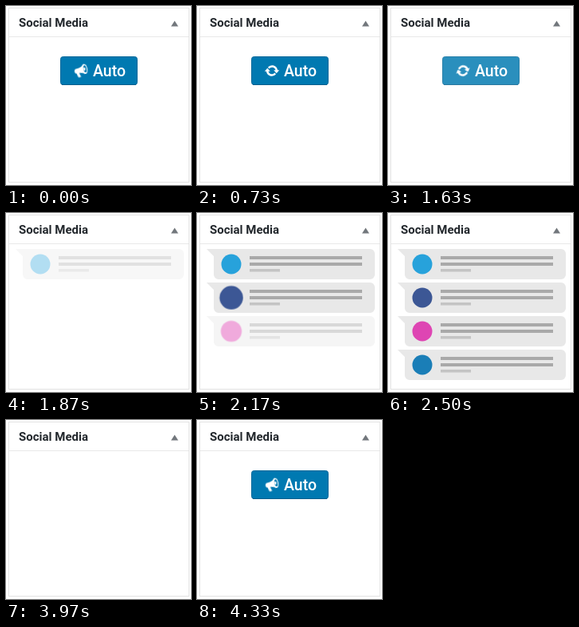
Animation, 232 px wide and 224 px high, one loop 5130 ms. Source, as an HTML page:

```html
<!DOCTYPE html>
<html lang="en">
<head>
<meta charset="utf-8">
<title>Social Media panel</title>
<style>
  html, body { margin: 0; width: 100%; height: 100%; overflow: hidden; background: #fff; }
  svg { display: block; width: 232px; height: 224px; }
  text { font-family: Roboto, Inter, sans-serif; font-weight: 500; }
  .title { font-size: 15px; font-weight: 600; fill: #23282d; }
  .label { font-size: 19.5px; fill: #fff; }
  .badge, #arrows { transform-box: fill-box; transform-origin: center; }
</style>
</head>
<body>
<svg id="stage" viewBox="0 0 232 224">
  <defs>
    <path id="arrow" d="M.2-6.72c3.53 0 6.43 2.61 6.92 6H9.2l-3.5 4-3.5-4h2.32C4.07-2.69 2.31-4.17.2-4.17c-1.45 0-2.73.71-3.54 1.78l-1.71-1.95C-3.77-5.8-1.89-6.72.2-6.72z"/>
    <g id="bubble">
      <path d="M12 0H217a6 6 0 0 1 6 6V32a6 6 0 0 1-6 6H27a6 6 0 0 1-6-6V9z" fill="#e8e8e8"/>
      <path d="M66 9h141v4H66zM66 17h141v4H66z" fill="#a9a9a9"/>
      <path d="M66 25h38v3.5H66z" fill="#c4c4c4"/>
    </g>
  </defs>
  <rect x="3.5" y="2.5" width="226" height="218" fill="#fff" stroke="#e2e2e2"/>
  <path d="M4 38.5H229" stroke="#e8e8e8"/>
  <text class="title" x="16" y="26">Social Media</text>
  <path d="M211.5 18.5 216 25.5H207z" fill="#72777c"/>

  <g id="button">
    <rect id="face" x="68.5" y="63.5" width="96" height="35" rx="3" fill="#0079b1" stroke="#006799"/>
    <path d="M70 98.5H163" stroke="#005d8c"/>
    <g id="megaphone" transform="translate(94 80) rotate(-12)">
      <path d="M-6-2.5C-1-2.5 2-4 4.5-6.5V6C2 4-1 3.5-3 3.5L-1.5 8.5H-5L-6.2 3.5C-9 3-9-2.2-6-2.5z" fill="#fff"/>
      <ellipse cx="4.8" cy="-.3" rx="3.5" ry="6.3" fill="#fff"/>
      <ellipse cx="5.3" cy="-.3" rx="1.9" ry="4.5" fill="#0079b1"/>
      <ellipse cx="4.5" cy="-.3" rx="1.2" ry="2" fill="#fff"/>
    </g>
    <g transform="translate(94 81)">
      <g id="arrows" fill="#fff">
        <use href="#arrow"/>
        <use href="#arrow" transform="rotate(180)"/>
      </g>
    </g>
    <text class="label" x="109" y="88">Auto</text>
  </g>
  <g id="rows"></g>
</svg>
<script>
const LOOP = 5130;
const SVG_NS = 'http://www.w3.org/2000/svg';
const COLORS = ['#27a2db', '#3c5795', '#de45b3', '#1a7eb7'];
const STAGGER = 140;
const byId = id => document.getElementById(id);

function add(parent, tag, attributes) {
  const node = document.createElementNS(SVG_NS, tag);
  for (const [name, value] of Object.entries(attributes)) node.setAttribute(name, value);
  return parent.appendChild(node);
}

// steps: [time in ms, value]; two steps at one time make a hard change.
function track(node, property, steps) {
  const all = [[0, steps[0][1]], ...steps, [LOOP, steps.at(-1)[1]]];
  const frames = all.map(([time, value]) => ({ offset: time / LOOP, [property]: value }));
  const animation = node.animate(frames, { duration: LOOP, iterations: Infinity });
  animation.startTime = document.timeline.currentTime;
}

const scale = value => `scale(${value})`;
const turn = degrees => `rotate(${degrees}deg)`;

track(byId('button'), 'opacity', [[1600, 1], [1790, 0], [4070, 0], [4330, 1]]);
track(byId('face'), 'fill', [[400, '#0079b1'], [400, '#0085ba'], [730, '#0085ba'], [730, '#0079b1']]);
track(byId('megaphone'), 'opacity', [[730, 1], [730, 0], [1800, 0], [1800, 1]]);
track(byId('arrows'), 'opacity', [[730, 0], [730, 1], [1800, 1], [1800, 0]]);
track(byId('arrows'), 'transform', [[730, turn(0)], [1800, turn(192.6)]]);

COLORS.forEach((fill, i) => {
  const start = 1800 + i * STAGGER;
  const row = add(byId('rows'), 'g', { transform: `translate(0 ${45 + i * 42})` });
  const fade = add(row, 'g', {});
  add(fade, 'use', { href: '#bubble' });
  const badge = add(fade, 'circle', { class: 'badge', cx: 43, cy: 19, r: 12.5, fill });
  track(fade, 'opacity', [[start, 0], [start + 200, 1], [3700, 1], [3940, 0]]);
  track(badge, 'transform', [
    [start + 80, scale(1)], [start + 170, scale(1.4)], [start + 280, scale(1)],
    [3720, scale(1)], [3940, scale(1.4)],
  ]);
});
</script>
</body>
</html>
```
